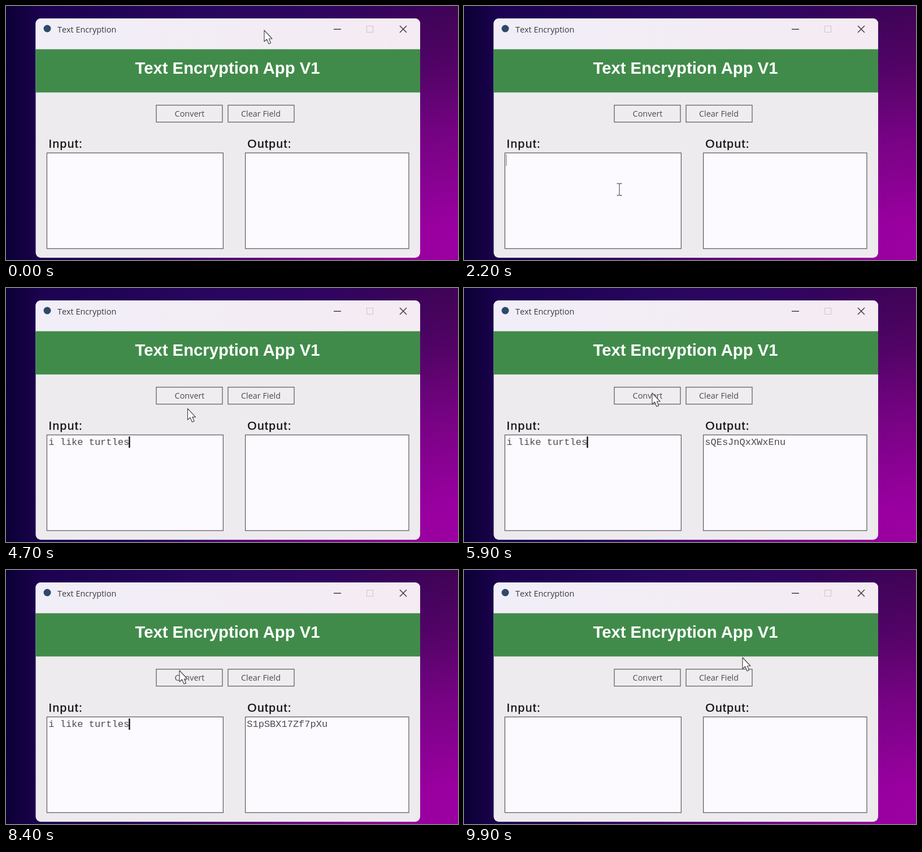
Write an HTML page that moves like this. It is 800x450 px and loops after 10 s.

```html
<!DOCTYPE html>
<html lang="en">
<head>
<meta charset="utf-8">
<title>Text Encryption</title>
<style>
  html, body { margin: 0; width: 100%; height: 100%; overflow: hidden; }
  body {
    background:
      radial-gradient(ellipse 610px 430px at 800px 430px,
        rgba(156,0,162,1) 0, rgba(156,0,162,.97) 12%, rgba(150,2,156,.6) 50%,
        rgba(140,4,146,.26) 75%, rgba(130,4,136,0) 100%),
      linear-gradient(90deg, #0b0034, #1c0250 8%, #28065e 45%, #2f0560 70%, #400355);
  }
  svg { display: block; width: 800px; height: 450px; }
  text { font-kerning: none; }
  .ui { font-family: "Open Sans", "Noto Sans", sans-serif; font-size: 14.4px; fill: #4c4a4e; }
  .head { font: bold 29.3px "Liberation Sans", Arial, sans-serif; fill: #fff; }
  .label {
    font: 21px "Liberation Sans", Arial, sans-serif; letter-spacing: 1.4px;
    fill: #111; stroke: #111; stroke-width: .4px;
  }
  .mono { font: 17px "Liberation Mono", "Courier New", monospace; fill: #4c4a4e; white-space: pre; }
  .mid { text-anchor: middle; }
  .box, .btn { fill: #fcfaff; stroke: #59575b; stroke-width: 1.2; }
  .btn { fill: #efedf0; }
</style>
</head>
<body>
<svg viewBox="0 0 800 450">
  <defs>
    <linearGradient id="bar">
      <stop offset="0" stop-color="#f1eef7"/>
      <stop offset="1" stop-color="#f5ebf3"/>
    </linearGradient>
    <clipPath id="frame"><rect x="52.5" y="22" width="680.5" height="424" rx="9"/></clipPath>
  </defs>

  <g clip-path="url(#frame)">
    <rect x="52" y="22" width="682" height="424" fill="#edebee"/>
    <rect x="52" y="22" width="682" height="55" fill="url(#bar)"/>
    <rect x="52" y="76.6" width="682" height="76.6" fill="#418b4a"/>
  </g>

  <circle cx="73" cy="40" r="6.5" fill="#2d4a68"/>
  <text class="ui" x="91" y="47" style="fill:#3a383c">Text Encryption</text>
  <g fill="none" stroke="#3f3d41" stroke-width="1.5">
    <path d="M580 41.3H593M697 35L709 47M709 35L697 47"/>
    <rect x="638.5" y="35.5" width="11" height="11" stroke="#cbc6cc" stroke-width="1"/>
  </g>

  <text class="head mid" x="392" y="120">Text Encryption App V1</text>

  <rect class="btn" x="266" y="175.7" width="117" height="30"/>
  <rect class="btn" x="393" y="175.7" width="117" height="30"/>
  <text class="ui mid" x="325" y="195.5">Convert</text>
  <text class="ui mid" x="451" y="195.5">Clear Field</text>

  <text class="label" x="75.3" y="251">Input:</text>
  <text class="label" x="427.3" y="251">Output:</text>
  <rect class="box" x="72.4" y="260.3" width="312" height="169.5"/>
  <rect class="box" x="423.6" y="260.3" width="289.4" height="169.5"/>
  <text class="mono" id="input" x="75.3" y="278"></text>
  <text class="mono" id="output" x="426.3" y="278"></text>
  <rect id="caret" y="263" height="20"/>

  <path id="arrow" d="M0 0V20L4.6 16L8 24L11.6 22.4L8.4 15H14Z"
    fill="#fff" stroke="#4a484d" stroke-width="1.2" stroke-linejoin="round"/>
  <path id="beam" d="M-4.5 -10.5H-1.5Q0 -10.5 0 -9Q0 -10.5 1.5 -10.5H4.5M0 -9V9M-4.5 10.5H-1.5Q0 10.5 0 9Q0 10.5 1.5 10.5H4.5"
    fill="none" stroke="#666" stroke-width="1.3"/>
</svg>

<script>
const LOOP = 10000, STEP = 100;
const PHRASE = "i like turtles", CHAR = 10.2;
const FOCUS = 1200, TYPE_START = 2350, KEY = 110, CLEAR = 9300;

// time, x, y of the pointer
const path = [
  [0, 457, 43], [300, 457, 43], [1100, 275, 325], [4200, 275, 325],
  [4900, 333, 186], [6200, 333, 186], [6600, 307, 178], [8600, 307, 178],
  [9100, 452, 192], [9400, 452, 192], [9800, 493, 155], [LOOP, 493, 155]
];
const results = [
  [0, ""], [5200, "sQEsJnQxXWxEnu"], [6900, "YyBYPIyHOJHBIf"],
  [7900, "S1pSBX17Zf7pXu"], [CLEAR, ""]
];

const [input, output, caret, arrow, beam] =
  ["input", "output", "caret", "arrow", "beam"].map(id => document.getElementById(id));
const show = (el, on) => el.setAttribute("visibility", on ? "visible" : "hidden");

function pointerAt(t) {
  const i = path.findIndex(p => p[0] > t);
  const [t0, x0, y0] = path[i - 1], [t1, x1, y1] = path[i];
  const k = (t - t0) / (t1 - t0), e = k * k * (3 - 2 * k);
  return [x0 + (x1 - x0) * e, y0 + (y1 - y0) * e];
}

function draw(t) {
  const typed = t < TYPE_START ? 0
    : Math.min(PHRASE.length, Math.floor((t - TYPE_START) / KEY) + 1);
  const count = t < CLEAR ? typed : 0;
  input.textContent = PHRASE.slice(0, count);
  output.textContent = results.filter(r => r[0] <= t).pop()[1];

  // the blink restarts with each key
  const lastKey = typed ? TYPE_START + (typed - 1) * KEY : FOCUS;
  show(caret, t >= FOCUS && (t - lastKey) % 900 < 600);
  caret.setAttribute("x", count ? 74.4 + count * CHAR : 74.5);
  caret.setAttribute("width", count ? 2.4 : 1);
  caret.setAttribute("fill", count ? "#111" : "#666");

  const [x, y] = pointerAt(t);
  const overText = y > 260 && y < 430 && x > 72 && x < 385;
  for (const el of [arrow, beam]) el.setAttribute("transform", `translate(${x} ${y})`);
  show(arrow, !overText);
  show(beam, overText);
}

function tick() {
  draw(Math.floor(performance.now() / STEP) * STEP % LOOP);
  requestAnimationFrame(tick);
}
tick();
</script>
</body>
</html>
```
